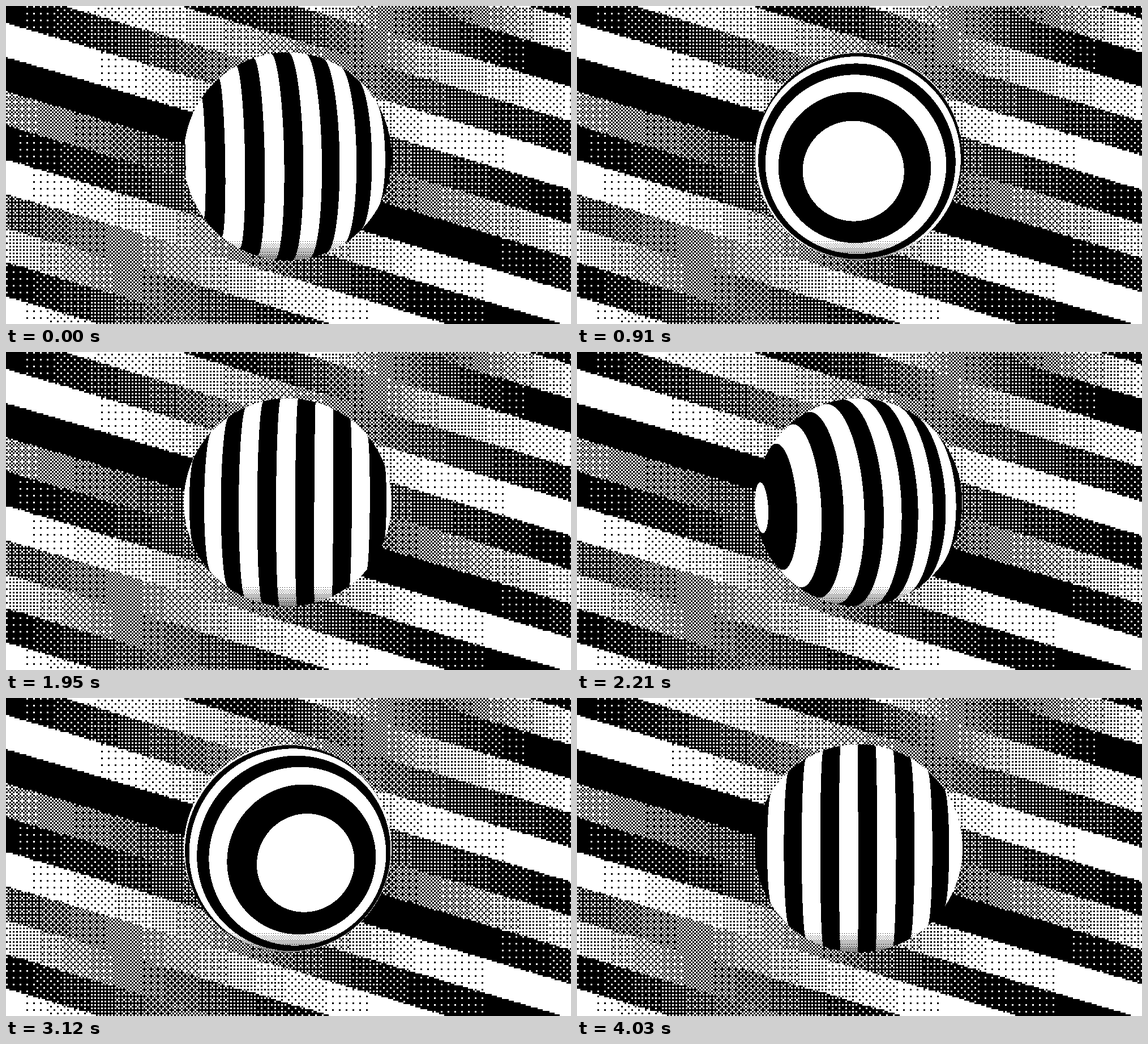
Recreate the animation shown at these times as an HTML page with a canvas. Size 998 px wide and 561 px high, loop 4.16 s.

```html
<!DOCTYPE html>
<html lang="en">
<head>
<meta charset="utf-8">
<title>Striped sphere</title>
<style>
html, body { margin: 0; width: 100%; height: 100%; overflow: hidden; background: #000; }
canvas { display: block; width: 100vw; height: 100vh; image-rendering: pixelated; }
</style>
</head>
<body>
<canvas id="stage" width="998" height="561"></canvas>
<script>
const W = 998, H = 561, STEP = 130, STEPS = 32;
const ctx = document.getElementById('stage').getContext('2d');
const image = ctx.createImageData(W, H);
const pixels = new Uint32Array(image.data.buffer);
const WHITE = 0xffffffff, BLACK = 0xff000000;

// Ordered dither, 4 x 4
const BAYER = [0, 8, 2, 10, 12, 4, 14, 6, 3, 11, 1, 9, 15, 7, 13, 5];
const dither = (level, x, y) =>
  level > (BAYER[(y & 3) * 4 + (x & 3)] + 0.5) / 16 ? WHITE : BLACK;

// Slanted bands: brightness at x = 0, 250, 500, 750, 1000
const CELL = 3, SLOPE = 0.2945, BAND = 60.3, FIRST = -331.8;
const BANDS = [
  [0, 0, 0, 0, 0.05],
  [0, 0, 0, 0.3, 0.88],
  [1, 1, 0.95, 0.3, -0.1],
  [0, 0, 0.2, 0.7, 0.92],
  [1, 0.85, 0.6, 0.3, 0.12],
  [0, 0.28, 0.6, 0.93, 1],
  [1.1, 0.9, 0.55, 0.25, 0.03],
  [0, 0, 0.1, 0.5, 0.85],
  [0.6, 0.33, 0.05, -0.05, 0.12],
  [0.02, 0.2, 0.55, 0.95, 1],
  [1, 0.8, 0.35, 0.05, 0],
  [0.28, 0.55, 0.85, 1.05, 1],
  [0.8, 0.45, 0.15, 0, 0],
  [0.03, 0.35, 0.7, 1, 1],
  [1, 0.7, 0.4, 0, 0]
];

function bandLevel(x, y) {
  const k = Math.floor((y - SLOPE * x - FIRST) / BAND);
  const row = BANDS[Math.max(0, Math.min(BANDS.length - 1, k))];
  const i = Math.min(3, Math.floor(x / 250));
  return row[i] + (row[i + 1] - row[i]) * (x / 250 - i);
}

function paintBackground() {
  for (let y = 0; y < H; y++) {
    for (let x = 0; x < W; x++) {
      const cx = Math.floor(x / CELL), cy = Math.floor(y / CELL);
      const level = bandLevel((cx + 0.5) * CELL, (cy + 0.5) * CELL);
      pixels[y * W + x] = dither(level, cx, cy);
    }
  }
}

// Sphere seen in perspective; dist is in radii
const CX = 497.5, CY = 265.2, R = 183.5, DIST = 10, TILT = 0.149;
const FOCAL = Math.sqrt(DIST * DIST - 1);

function traceSphere() {
  const points = [];
  for (let py = 78; py < 453; py++) {
    for (let px = 311; px < 685; px++) {
      const mx = (px + 0.5 - CX) / R / FOCAL;
      const my = (py + 0.5 - CY) / R / FOCAL;
      const q = mx * mx + my * my;
      const disc = 1 + q - q * DIST * DIST;
      if (disc < 0) continue;
      const z = (q * DIST + Math.sqrt(disc)) / (1 + q);
      const x = mx * (DIST - z), y = my * (DIST - z);
      const light = 1 - Math.max(0, (py - CY) / R - 0.8) * 2.6;
      points.push({
        at: py * W + px,
        side: x,
        front: z * Math.cos(TILT) + y * Math.sin(TILT),
        lit: dither(light, px, py)
      });
    }
  }
  return points;
}

// Stripes are slices across a turning axis, sliding slowly along it
const PERIOD = 0.3324;

function draw(step) {
  const angle = (-82.7 + 11.38 * step) * Math.PI / 180;
  const shift = 0.156 - 0.037 * step;
  const s = Math.sin(angle), c = Math.cos(angle);
  for (const p of sphere) {
    const u = (p.side * s + p.front * c - shift) / PERIOD;
    pixels[p.at] = u - Math.floor(u) < 0.5 ? p.lit : BLACK;
  }
  ctx.putImageData(image, 0, 0);
}

paintBackground();
const sphere = traceSphere();
const start = performance.now();
let shown = -1;

function tick() {
  const step = Math.floor((performance.now() - start) / STEP) % STEPS;
  if (step !== shown) draw(shown = step);
  requestAnimationFrame(tick);
}
tick();
</script>
</body>
</html>
```
